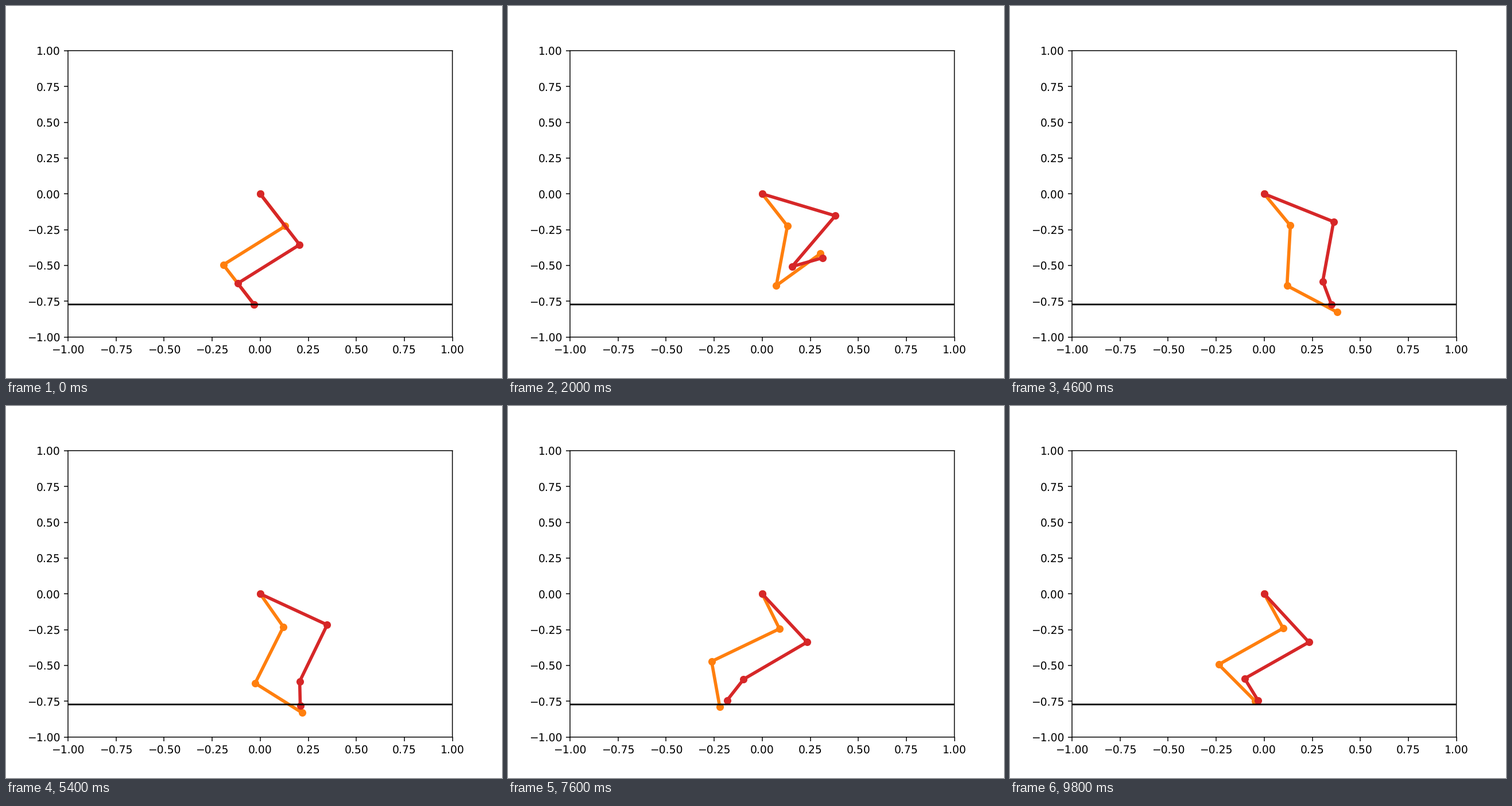
Animation, 864 px wide and 648 px high, one loop 10000 ms. Source, as a matplotlib script:

```python
import numpy as np
import matplotlib.pyplot as plt
from matplotlib.animation import FuncAnimation

plt.rcParams.update({"path.snap": False, "text.hinting": "none"})

STEPS = 48          # poses in one gait cycle
REST_FRAMES = 2     # the legs hold their rest pose first
REST = (-60, -140, -60)

# Key poses of the gait: absolute link angles (thigh, shank, foot) in degrees,
# first for the orange leg, then for the red one
KEYS = {
    5: (-63, -123, 8, -46, -122, 8),
    8: (-59.7, -97.9, 44.2, -21.9, -122.4, 21),
    13: (-57.7, -87.5, -4.7, -20.2, -97.5, -31.8),
    21: (-58.4, -92.4, -35.3, -28.3, -97.7, -74.4),
    29: (-66.7, -130.2, -46.5, -37, -124.5, -101),
    36: (-69.8, -147.2, -82.4, -55.2, -141.9, -120.3),
    42: (-70, -154, -100, -63, -152.5, -123),
    47: (-67.7, -143, -53.4, -55.4, -142.8, -65.5),
}


def gait(step):
    """Angles on a smooth closed curve through the key poses."""
    x = np.array([k + turn * STEPS for turn in (-1, 0, 1) for k in KEYS])
    y = np.array(list(KEYS.values()) * 3)
    slope = np.gradient(y, x, axis=0)
    i = np.searchsorted(x, step, side="right") - 1
    h = x[i + 1] - x[i]
    u = (step - x[i]) / h
    ease = u * u * (3 - 2 * u)
    bend = u * (1 - u) * h * ((1 - u) * slope[i] - u * slope[i + 1])
    return y[i] + ease * (y[i + 1] - y[i]) + bend


def joints(lengths, angles):
    a = np.radians(angles)
    x = np.cumsum(np.r_[0, lengths * np.cos(a)])
    y = np.cumsum(np.r_[0, lengths * np.sin(a)])
    return x, y


fig, ax = plt.subplots(figsize=(6.4, 4.8), dpi=135)
ax.set_xlim(-1, 1)
ax.set_ylim(-1, 1)

lengths = np.array([(0.26, 0.42, 0.32), (0.41, 0.42, 0.17)])
legs = [ax.plot([], [], "o-", lw=3, color=color)[0]
        for color in ("tab:orange", "tab:red")]

ground = joints(lengths[0], REST)[1][-1]
ax.axhline(ground, color="black")


def update(frame):
    if frame < REST_FRAMES:
        poses = (REST, REST)
    else:
        poses = gait(frame - REST_FRAMES).reshape(2, 3)
    for leg, links, pose in zip(legs, lengths, poses):
        leg.set_data(*joints(links, pose))
    return legs


anim = FuncAnimation(fig, update, frames=STEPS + REST_FRAMES, interval=200,
                     repeat=True, repeat_delay=0)
plt.show()
```
